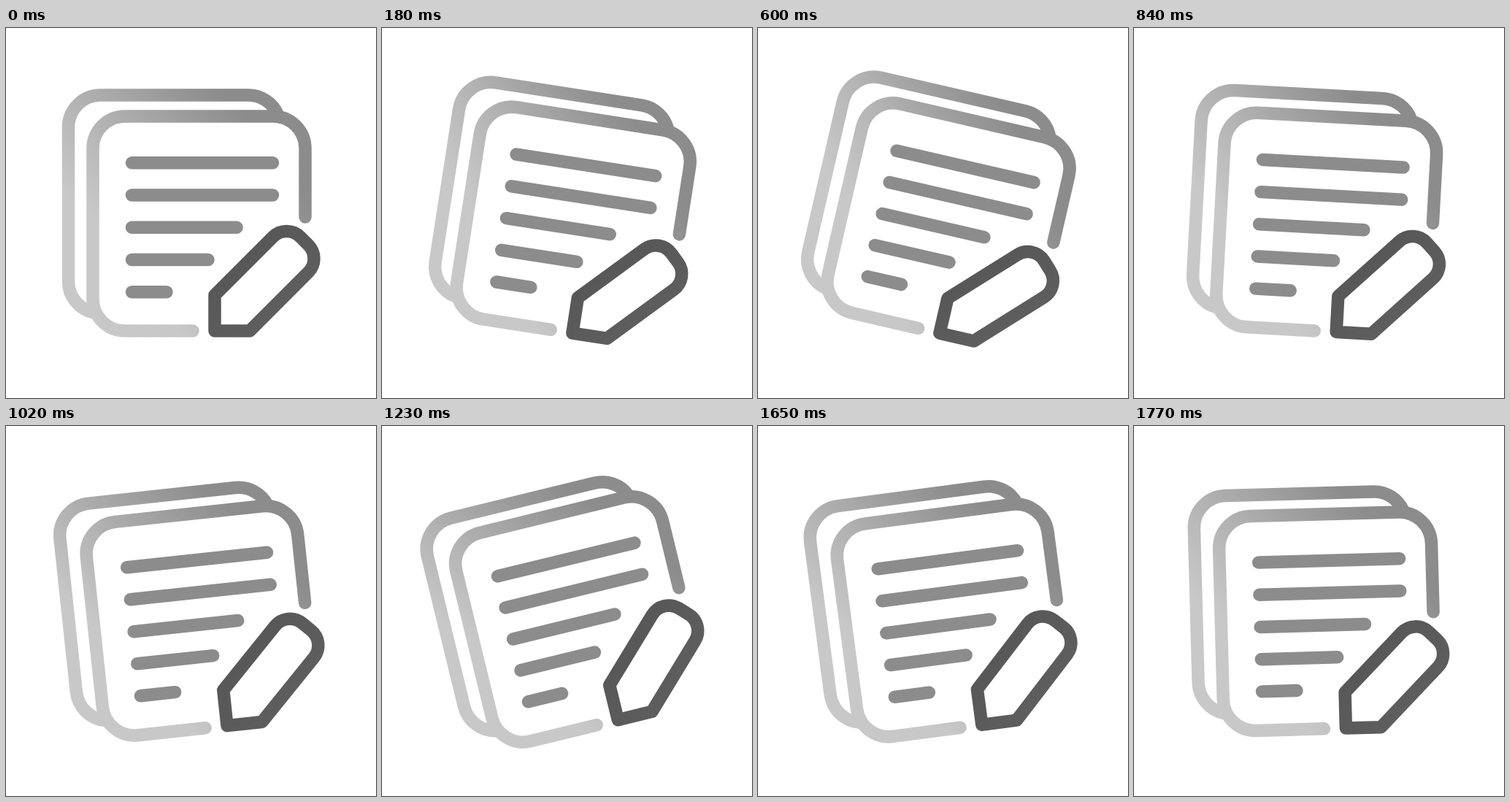
Recreate the animation shown at these times as an HTML page. Size 507x507 px, loop 1.8 s.

```html
<!DOCTYPE html>
<html lang="en">
<head>
<meta charset="utf-8">
<title>Notes</title>
<style>
  html, body { margin: 0; width: 100%; height: 100%; overflow: hidden; background: #fff; }
  svg { display: block; width: 100%; height: 100%; }
</style>
</head>
<body>
<svg viewBox="0 0 507 507">
  <defs>
    <linearGradient id="frontTone" gradientUnits="userSpaceOnUse" x1="150" y1="300" x2="350" y2="150">
      <stop offset="0" stop-color="#c8c8c8"/>
      <stop offset="1" stop-color="#8c8c8c"/>
    </linearGradient>
    <linearGradient id="backTone" gradientUnits="userSpaceOnUse" x1="116" y1="271" x2="316" y2="121">
      <stop offset="0" stop-color="#c8c8c8"/>
      <stop offset="1" stop-color="#8c8c8c"/>
    </linearGradient>
    <linearGradient id="pencilTone" gradientUnits="userSpaceOnUse" x1="310" y1="320" x2="380" y2="390">
      <stop offset="0" stop-color="#575757"/>
      <stop offset="1" stop-color="#5e5e5e"/>
    </linearGradient>
  </defs>
  <g id="icon" fill="none" stroke-width="17.5" stroke-linejoin="round" stroke-linecap="round">
    <path stroke="url(#backTone)" stroke-linecap="butt"
      d="M120 390A44 44 0 0 1 85.5 347V136A44 44 0 0 1 129.5 92H332A44 44 0 0 1 372.8 119.5"/>
    <path stroke="url(#frontTone)"
      d="M256 415H163A44 44 0 0 1 119 371V165A44 44 0 0 1 163 121H366A44 44 0 0 1 410 165V259"/>
    <path stroke="#8c8c8c"
      d="M172.5 184.7H365.5M172.5 229H365.5M172.5 273.3H316M172.5 317.5H277M172.5 361.7H220"/>
    <path stroke="url(#pencilTone)"
      d="M286 415V366L365.8 286.2A26.5 26.5 0 0 1 403.2 286.2L414.3 297.3A26.5 26.5 0 0 1 414.3 334.7L334 415Z"/>
  </g>
</svg>
<script>
  const LOOP = 1800, STEP = 30, SWING = 15, CENTER = 253.5;
  const icon = document.getElementById('icon');
  const start = performance.now();

  function draw(ms) {
    const t = Math.floor((ms % LOOP) / STEP) * STEP;
    const angle = SWING * Math.sin(2 * Math.PI * t / LOOP);
    icon.setAttribute('transform', `rotate(${angle} ${CENTER} ${CENTER})`);
  }

  function tick() {
    draw(performance.now() - start);
    requestAnimationFrame(tick);
  }

  draw(0);
  requestAnimationFrame(tick);
</script>
</body>
</html>
```
